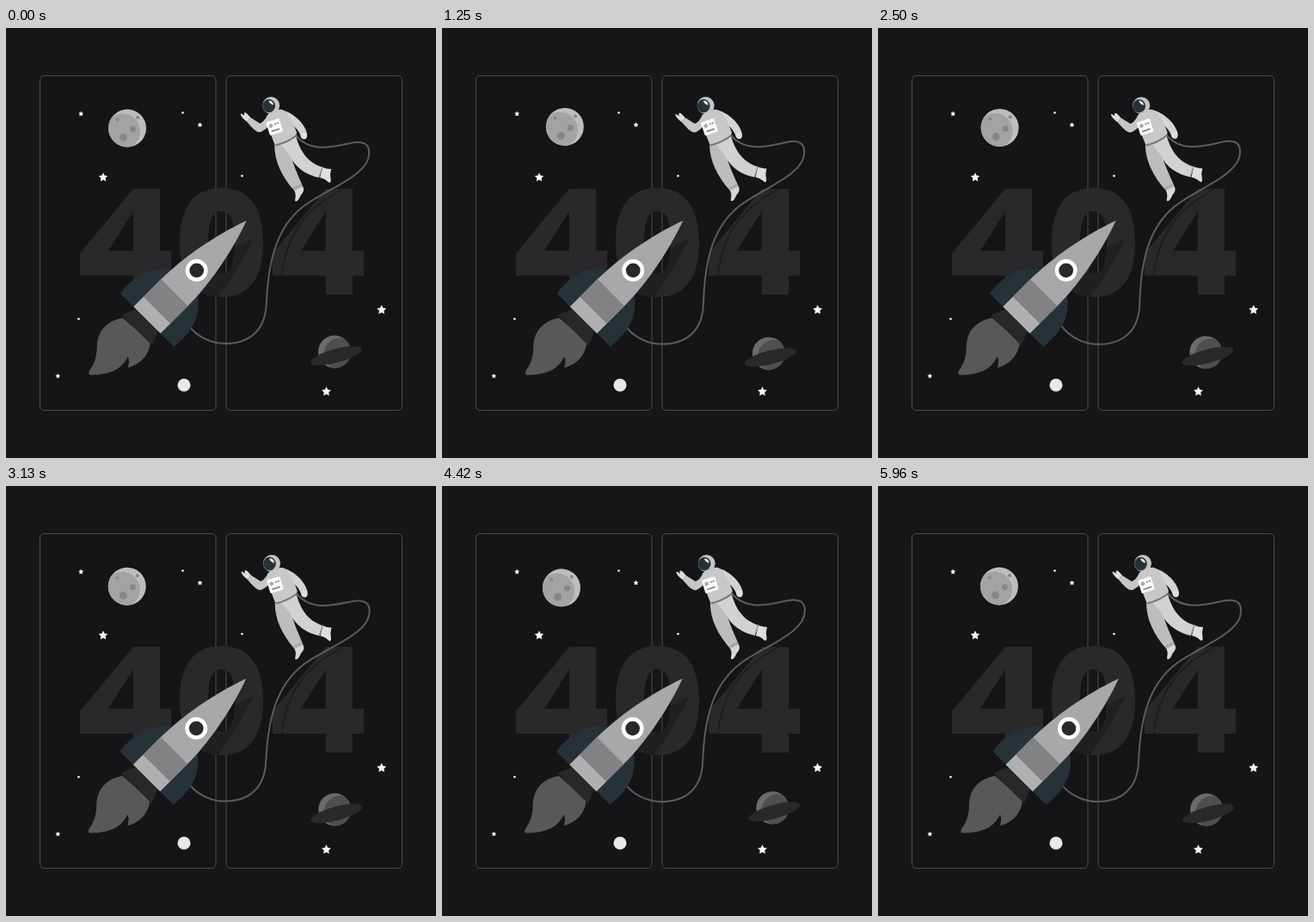
Recreate the animation shown at these times as an HTML page. Size 500 by 500 pixels, loop 6 s.

```html
<!DOCTYPE html>
<html lang="en">
<head>
<meta charset="utf-8">
<title>404</title>
<style>
  html, body { margin: 0; width: 100%; height: 100%; overflow: hidden; background: #171719; }
  svg { display: block; width: 100vw; height: 100vh; }
</style>
</head>
<body>
<svg viewBox="0 0 500 500">
  <defs>
    <path id="four" d="M148 187H179V259H192V288H179V310H148V288H86V262ZM148 213L119 259H148Z" fill-rule="evenodd"/>
    <path id="zero" d="M250.500 186C283 186 299 209 299 249.500S283 313 250.500 313S202 290 202 249.500S218 186 250.500 186ZM250.500 213C240 213 235 224 235 249.500S240 286 250.500 286S266 275 266 249.500S261 213 250.500 213Z" fill-rule="evenodd"/>
    <path id="body" d="M-22 0V-45C-22 -80 -14 -125 0 -163.500C14 -125 22 -80 22 -45V0Z"/>
    <path id="fin" d="M-21 0H-44C-47 -28 -41 -48 -21 -62Z"/>
    <clipPath id="inZero"><use href="#zero" clip-rule="evenodd"/></clipPath>
    <clipPath id="inFour"><use href="#four" x="224" clip-rule="evenodd"/></clipPath>
    <clipPath id="inMoon"><circle cx="141" cy="116.500" r="22"/></clipPath>
    <clipPath id="inPlanet"><circle cx="382" cy="376.500" r="19"/></clipPath>
  </defs>

  <g fill="#151517" stroke="#4c4c4e">
    <rect x="39.500" y="55.500" width="204.500" height="389" rx="5"/>
    <rect x="256" y="55.500" width="204.500" height="389" rx="5"/>
  </g>

  <g fill="#29292b">
    <use href="#four"/>
    <use href="#zero"/>
    <use href="#four" x="224"/>
  </g>
  <g clip-path="url(#inZero)"><use href="#body" transform="translate(172 360) rotate(45)" fill="#202022"/></g>
  <path clip-path="url(#inFour)" d="M392 187C360 204 325 229 320 295" fill="none" stroke="#1e1e20" stroke-width="2"/>

  <g id="stars" fill="#fafafa">
    <circle cx="207" cy="415.300" r="7.500" fill="#e8e8e8"/>
    <circle cx="205.500" cy="98.500" r="1.300"/>
    <circle cx="274.500" cy="172" r="1.300"/>
    <circle cx="84.500" cy="338.300" r="1.300"/>
  </g>

  <g id="sky">
    <g id="dust" fill="#1c1c1e"></g>
    <circle cx="141" cy="116.500" r="22" fill="#bdbdbd"/>
    <g clip-path="url(#inMoon)">
      <circle cx="135.500" cy="120" r="20.500" fill="#a3a3a3"/>
      <g fill="#868686">
        <circle cx="147.500" cy="117.500" r="3.500"/>
        <circle cx="136.500" cy="127" r="4.500"/>
        <circle cx="129.500" cy="106.500" r="2"/>
        <circle cx="153" cy="104" r="2"/>
      </g>
    </g>
    <circle cx="382" cy="376.500" r="19" fill="#6b6b6d"/>
    <circle cx="388" cy="379" r="18.500" fill="#4f4f51" clip-path="url(#inPlanet)"/>
    <ellipse cx="384" cy="381" rx="31" ry="8" transform="rotate(-15 384 381)" fill="#29292b"/>
  </g>

  <g id="astronaut">
    <path d="M211 344C222 360 240 367 255 367C285 367 302 350 303 320C305 270 315 232 345 208C370 188 422 172 422 146C423 134 414 131 402 133.500C380 138 354 146 336 124" fill="none" stroke="#5c5c5e" stroke-width="2"/>
    <path d="M312 136L330 132C328 147 337 165 345 184L335 189C321 173 312 155 312 136Z" fill="#bdbdbd"/>
    <path d="M345 184L335 189C338 194 336 198 336 201C339 203 341 198 343 194C346 191 347 188 345 184Z" fill="#d8d8d8"/>
    <path d="M319 135L337 126C342 143 350 156 368 162L364 174C350 171 336 163 329 147Z" fill="#d2d2d2"/>
    <path d="M368 162L365 174C370 175 372 177 376 180C379 179 377 175 377 170L378 164C374 164 371 163 368 162Z" fill="#dedede"/>
    <path d="M334 187L344 182M364 173L368 161" stroke="#8c8c8c"/>
    <path d="M304 101C301 107 298 110 295 111L284 104L280 109C286 116 291 122 296 121C300 119 304 116 307 112Z" fill="#c6c6c6"/>
    <path d="M284 104L280 109C276 106 273 103 272.500 100C274 99 275 101 277 102C276 99 277 98 278.500 98.500C281 100 282 102 284 104Z" fill="#dedede"/>
    <path d="M318 95C330 96 345 108 349 120L342 124C338 115 330 110 324 107Z" fill="#d4d4d4"/>
    <path d="M349 120L342 123C342 127 344 130 348 129C351 127 350 123 349 120Z" fill="#dedede"/>
    <path d="M303 103C304 99 314 94 321 95C328 98 334 110 338 122L336 127L313 137C309 127 304 115 303 103Z" fill="#c8c8c8"/>
    <path d="M313 136.500Q328 133 338 124.500" fill="none" stroke="#777" stroke-width="2"/>
    <g transform="translate(312 115) rotate(-18)">
      <rect x="-8" y="-8" width="16" height="16" rx="1" fill="#fafafa"/>
      <circle cx="-3.500" cy="-2.500" r="2.300" fill="#aaa"/>
      <path d="M1 -3H3M4 -3H6M-5 4H5" stroke="#777" stroke-width="1.500"/>
    </g>
    <circle cx="308" cy="90" r="10" fill="#c4c4c4"/>
    <ellipse cx="305.500" cy="90.500" rx="7.300" ry="7.800" fill="#263238"/>
    <path d="M305 84.500Q310 84 311 89.500Q307 89 305 84.500Z" fill="#f0f0f0"/>
  </g>

  <g id="rocket">
    <path d="M136 337C120 340 107 350 106 370C106 384 102 392 97 399Q95 404 100 403.500C118 403 134 399 142 382C144 387 143 391 142 395C157 391 167 380 168 365Z" fill="#58585a"/>
    <g transform="translate(164.300 339.500) rotate(45)">
      <path d="M-18 0L-25 17H25L18 0Z" fill="#28282a"/>
      <use href="#fin" fill="#263238"/>
      <use href="#fin" transform="scale(-1 1)" fill="#263238"/>
      <use href="#body" fill="#a8a8aa"/>
      <path d="M-22 -16V-45H22V-16Z" fill="#828284"/>
      <path d="M-22 0V-16H22V0Z" fill="#b0b0b2"/>
      <circle cy="-81.500" r="10.700" fill="#29292b" stroke="#fff" stroke-width="4.600"/>
    </g>
  </g>
</svg>
<script>
  const $ = id => document.getElementById(id);

  function add(parent, tag, attrs) {
    const el = document.createElementNS('http://www.w3.org/2000/svg', tag);
    for (const key in attrs) el.setAttribute(key, attrs[key]);
    parent.append(el);
  }

  function star(x, y, r) {
    const points = Array.from({ length: 10 }, (_, i) => {
      const a = i * Math.PI / 5, d = i % 2 ? r * 0.5 : r;
      return [x + d * Math.sin(a), y - d * Math.cos(a)];
    });
    add($('stars'), 'polygon', { points: points.join(' ') });
  }

  [[113, 173.7, 5.5], [436.7, 327.8, 5.7], [372.5, 422.8, 5.7],
   [87.2, 99.8, 3.2], [225.5, 112.7, 3.2], [60.3, 404.7, 3]].forEach(s => star(...s));

  [[170, 68], [199, 146], [75, 216], [277, 137], [338, 331], [292, 408], [422, 95]]
    .forEach(([cx, cy]) => add($('dust'), 'circle', { cx, cy, r: 0.8 }));

  // Linear interpolation through [position, value] stops.
  function track(stops, p) {
    const i = stops.findIndex(s => s[0] > p);
    const [p0, v0] = stops[i - 1], [p1, v1] = stops[i];
    return v0 + (v1 - v0) * (p - p0) / (p1 - p0);
  }

  const sway = [[0, 0], [0.25, 1], [0.75, -1], [1, 0]];
  const shake = [0, -1, 2, -4, 4, -4, 4, -4, 2, -1, 0].map((v, i) => [i / 10, v]);
  const LEAD = 35;

  function frame() {
    const t = performance.now() + LEAD;
    const slow = t % 6000 / 6000, quick = t % 1500 / 1500;
    $('sky').setAttribute('transform', `rotate(${track(sway, slow)} 250 238)`);
    $('astronaut').setAttribute('transform', `rotate(${track(sway, quick)} 318 224)`);
    $('rocket').setAttribute('transform', `translate(${track(shake, quick)} 0)`);
    requestAnimationFrame(frame);
  }
  frame();
</script>
</body>
</html>
```
